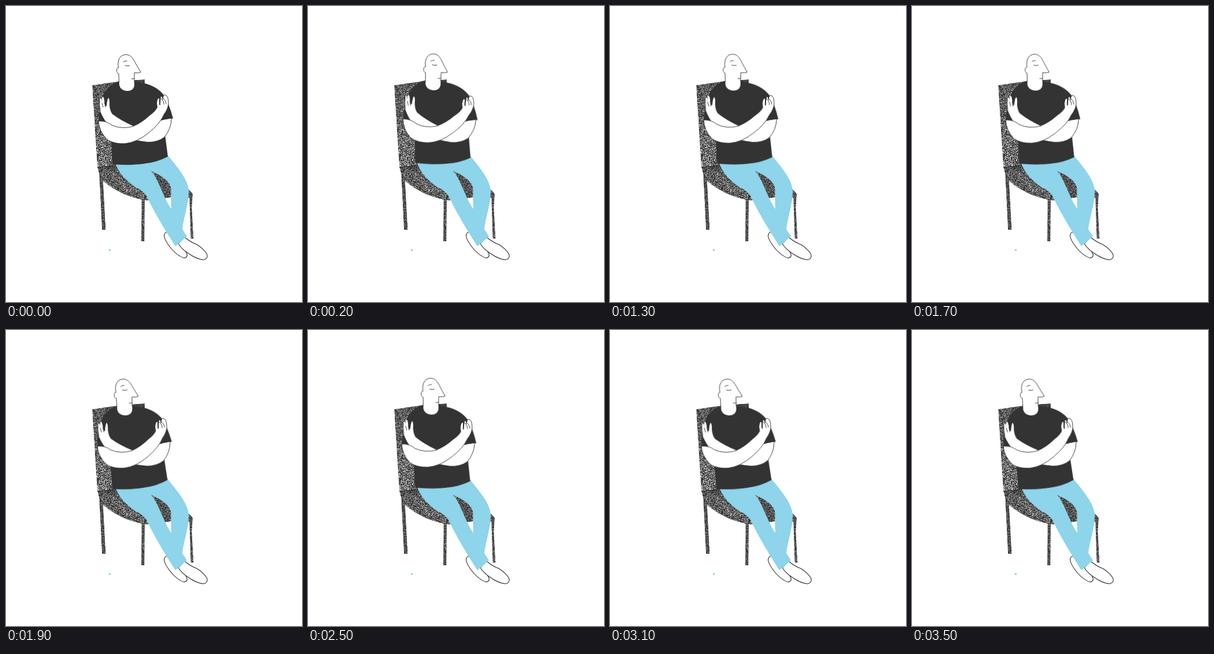
An HTML page with a canvas that plays this animation: 512x512 px, repeating every 3600 ms.

```html
<!DOCTYPE html>
<html lang="en">
<head>
<meta charset="utf-8">
<title>Rocking on a chair</title>
<style>
  html, body { margin: 0; width: 100%; height: 100%; overflow: hidden; background: #fff; }
  canvas, svg { position: absolute; left: 0; top: 0; width: 512px; height: 512px; }
  .line { fill: none; stroke: #2a2a2a; stroke-width: .9; stroke-linecap: round; stroke-linejoin: round; }
  .skin { fill: #fff; }
  .shirt { fill: #333; }
  .blue { fill: #8ed4eb; }
  #feet .line { fill: #fff; stroke-width: 1.1; }

  /* Tilt in held 100 ms poses, resting at each end */
  #body { transform-origin: 238px 285px; animation: rock 1.2s step-end infinite; }
  @keyframes rock {
    0%, 50%, 100% { transform: rotate(0deg); }
    8.333% { transform: rotate(1.4deg); }
    16.666% { transform: rotate(2.8deg); }
    41.666% { transform: rotate(1.4deg); }
    58.333% { transform: rotate(-1.4deg); }
    66.666% { transform: rotate(-2.8deg); }
    91.666% { transform: rotate(-1.4deg); }
  }
</style>
</head>
<body>
<canvas id="chair" width="512" height="512"></canvas>
<svg viewBox="0 0 512 512">
  <circle class="blue" cx="179.5" cy="422.3" r="1.7"/>

  <g id="feet">
    <path class="line" d="M299 409Q307 417 312 427Q316 434 308 436Q298 433 287 421Q275 407 273.500 398Q274 391 279 391Z"/>
    <path class="line" d="M309 400Q320 409 330 412.500Q342 420 347.500 429Q350 437 342 439Q330 438 317 429Q304 421 298 411Z"/>
  </g>

  <path class="blue" fill-rule="evenodd" d="M188 268C193 288 207 301 222 312Q240 321 244 330C255 355 278 392 293 415.500L313 398.500L305 386C307 366 317 340 316 318C314 298 294 276 278 256Z
    M251 285.500C263 297 273 333 286 351Q285 333 285.500 316Q283 299 251 285.500Z"/>

  <g id="body">
    <path class="shirt" d="M196 130.500Q185 133 177 141Q169 148 166 161Q161 178 160 199L181 209L182 236L184.500 274Q215 276 237 273Q260 271 280 260.500L275 222L272 197L289 194.500Q282 168 273 154Q260 138 238 133.500L220 130Z"/>

    <!-- far arm -->
    <path class="skin" d="M163 182Q161 172 162 163Q163 158 165 161L166 167Q165 158 167.500 157Q169.500 157 170.500 167L172 173L174 173Q175 161 177 159Q179.500 160 179 172Q180 182 184 187Q200 199 221 208L268 198L286 194.500Q286 212 274 227Q262 236 245 235.500Q234 234.500 224 232L200 222L174 202Q168 194 163 182Z"/>
    <path class="line" d="M286 195Q286 212 274 227Q262 236 245 235.500Q234 234.500 228 233"/>
    <path class="line" d="M163 181Q161 172 162 163M166 168L168 175M170.500 167L172 175"/>

    <!-- near arm -->
    <path class="skin" d="M160 199Q161 217 175 231Q187 239 206 238Q226 236 246 220Q267 203 273 188Q281 177 281 168Q281 155 275 153.500Q272 153 272 160L271 163Q270 155 268 157Q267 161 267 171Q265 173 265 168L265 160Q262 158 261 168L262 175Q260 181 248 190Q235 202 221 208Q200 214 183 206Q173 198 160 199Z"/>
    <path class="line" d="M160 199Q161 217 175 231Q187 239 206 238Q226 236 246 220Q267 203 273 188Q281 177 281 168Q281 155 275 153.500Q272 153 271 158M160 199Q173 198 183 206Q200 214 221 208M272 160Q276 162 277 169M268 160Q273 163 273 170"/>

    <!-- head -->
    <path class="skin" d="M195 117C190 116 191 105 194.500 107C192 94 197 84 208 84C216 84.500 220 91 224 99L233 114.500Q229 116.500 222 115.500L222 137Q221 147 209 147Q198 146 196 137Z"/>
    <path class="line" d="M195.500 132L195 117C190 117 191 105 194.500 107C192 94 197 84 208 84C216 84.500 220 91 224 99L233 114.500Q229 116.500 222 115.500L222 131"/>
    <path class="line" d="M206 103Q210 104.500 214 103M203 97Q205.500 94.500 209 95M217 126L222 125.700"/>
  </g>
</svg>
<script>
  const ctx = document.getElementById('chair').getContext('2d');
  const legs = 'M161 287L168 303L172.500 387H166Z M234.500 334H240L239.500 407H234Z M317 328L323 325L321.500 350L324.500 402.500H319.500Z';
  const back = 'M149 137L197 130L240 127V136L200 150V276L158 280Z';
  const seat = 'M158 278L200 274L262 279L296 300L318 319L323 325L322 332L287 331L243 336.500Q200 330 168 303L161 290Z';

  let seed = 7;
  function rand() {
    seed = (seed + 0x6D2B79F5) | 0;
    let t = Math.imul(seed ^ (seed >>> 15), seed | 1);
    t ^= t + Math.imul(t ^ (t >>> 7), t | 61);
    return ((t ^ (t >>> 14)) >>> 0) / 4294967296;
  }

  // Dark shape under pale grain; light(x, y) is the mean strength of the grain
  function grain(shape, [x0, y0, x1, y1], light) {
    const path = new Path2D(shape);
    ctx.save();
    ctx.clip(path);
    ctx.fillStyle = '#2b2b2b';
    ctx.fill(path);
    for (let y = y0; y < y1; y++) {
      for (let x = x0; x < x1; x++) {
        ctx.fillStyle = `rgba(255,255,255,${Math.min(1, 3 * light(x, y) * rand() ** 2)})`;
        ctx.fillRect(x, y, 1, 1);
      }
    }
    ctx.restore();
  }

  grain(legs, [160, 285, 326, 408], () => 0.2);
  grain(back, [148, 126, 241, 281], (x, y) => x > 215 ? 0.12 : 0.24 + 0.0008 * (y - 136));
  grain(seat, [157, 273, 324, 338], (x, y) => x > 245 ? 0.2 : Math.min(0.28, 0.16 + 0.006 * (y - 276)));

  ctx.strokeStyle = '#2b2b2b';
  ctx.stroke(new Path2D('M158.500 279.500L190 275.500M163 291Q175 312 238 335.500'));
</script>
</body>
</html>
```
